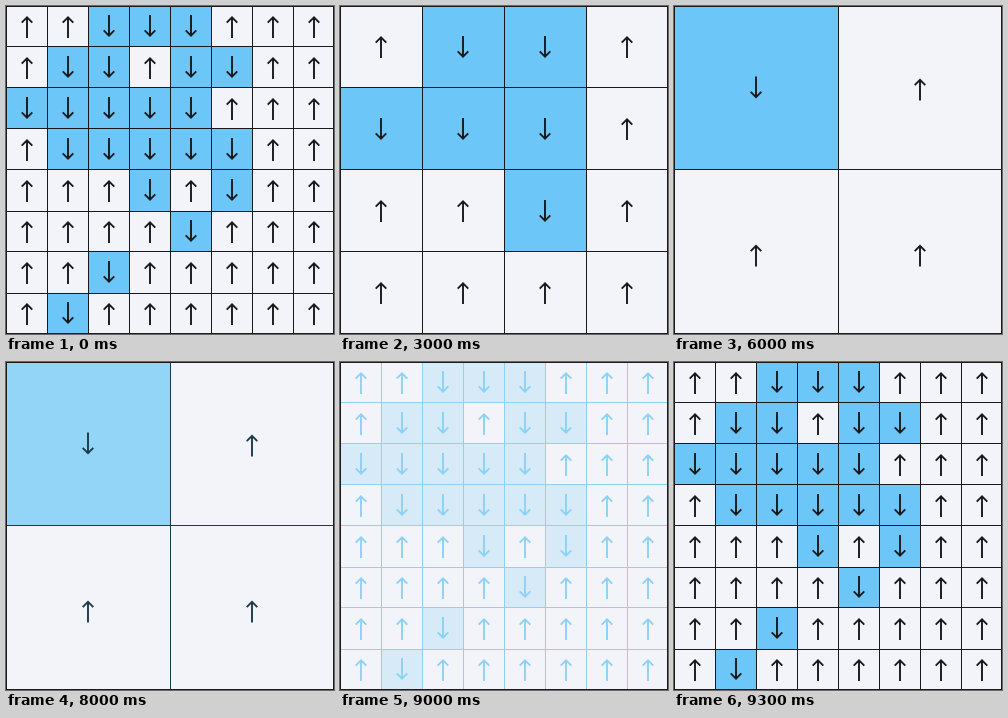
Recreate the animation shown at these times as an HTML page with a canvas. Size 328 by 328 pixels, loop 9400 ms.

```html
<!DOCTYPE html>
<html lang="en">
<head>
<meta charset="utf-8">
<title>Block spins</title>
<style>
html, body { margin: 0; overflow: hidden; }
canvas { display: block; }
</style>
</head>
<body>
<canvas id="stage" width="328" height="328"></canvas>
<script>
const ctx = document.getElementById('stage').getContext('2d');
const LOOP = 9400;
const PAPER = '#f2f4f9', BORDER = '#1d1a1b';
// Colours from fully faded (0) to full strength (5)
const INK = [PAPER, '#d6ebf8', '#8cd2f6', '#4b819b', '#1b3a4a', '#19191b'];
const BLUE = [PAPER, '#d6eaf7', '#d6eaf7', '#93d5f7', '#93d5f7', '#6cc6f8'];
// Grid line positions for the finest grid
const X = [0, 41, 82, 123, 164, 205, 246, 287, 327];
const Y = [0, 40, 81, 122, 163, 205, 245, 287, 327];

const fine = ['..ddd...', '.dd.dd..', 'ddddd...', '.ddddd..',
              '...d.d..', '....d...', '..d.....', '.d......']
  .map(row => [...row].map(c => c === 'd' ? 1 : 0));

// Majority of each 2x2 block; the top right spin settles a tie
function coarsen(s) {
  const half = Array.from({ length: s.length / 2 }, (_, i) => i);
  return half.map(r => half.map(c => {
    const a = s[2 * r], b = s[2 * r + 1];
    return +(a[2 * c] + 1.5 * a[2 * c + 1] + b[2 * c] + b[2 * c + 1] > 2.25);
  }));
}
const medium = coarsen(fine), coarse = coarsen(medium);

function arrow(x, y, dir) {
  ctx.beginPath();
  ctx.moveTo(x, y - 11 * dir);
  ctx.lineTo(x, y + 10 * dir);
  ctx.moveTo(x - 5.3, y + 4.4 * dir);
  ctx.lineTo(x, y + 9.7 * dir);
  ctx.lineTo(x + 5.3, y + 4.4 * dir);
  ctx.stroke();
}

function arrowCentre(n, r, c, down) {
  if (n === 8) return [41 * c + 21, 41 * r + (down ? 20 : 21)];
  if (n === 4) return [82 * c + 41, 82 * r + 41];
  return [164 * c + 82, 166 * r + (down ? 81.5 : 83.5)];
}

// lineStep: spacing of grid lines in fine cells
function draw(spins, lineStep, level) {
  const n = spins.length, k = 8 / n;
  ctx.fillStyle = PAPER;
  ctx.fillRect(0, 0, 328, 328);
  if (level > 0) {
    ctx.fillStyle = BLUE[level];
    spins.forEach((row, r) => row.forEach((down, c) => {
      const x = X[c * k], y = Y[r * k];
      if (down) ctx.fillRect(x, y, X[c * k + k] - x, Y[r * k + k] - y);
    }));
    ctx.fillStyle = ctx.strokeStyle = INK[level];
    for (let i = lineStep; i < 8; i += lineStep) {
      ctx.fillRect(X[i], 0, 1, 328);
      ctx.fillRect(0, Y[i], 328, 1);
    }
    ctx.lineWidth = 1.9;
    spins.forEach((row, r) => row.forEach((down, c) =>
      arrow(...arrowCentre(n, r, c, down), down ? 1 : -1)));
  }
  ctx.strokeStyle = BORDER;
  ctx.lineWidth = 1;
  ctx.strokeRect(0.5, 0.5, 327, 327);
}

function render(t) {
  if (t < 2000) draw(fine, 1, 5);
  else if (t < 3000) draw(fine, 2, 5);
  else if (t < 5000) draw(medium, 2, 5);
  else if (t < 6000) draw(medium, 4, 5);
  else if (t < 8000) draw(coarse, 4, 5);
  else if (t < 8900) draw(coarse, 4, Math.max(0, 4 - Math.floor((t - 8000) / 100)));
  else draw(fine, 1, Math.min(5, 1 + Math.floor((t - 8900) / 100)));
}

const start = performance.now();
function tick() {
  render((performance.now() - start) % LOOP);
  requestAnimationFrame(tick);
}
tick();
</script>
</body>
</html>
```
